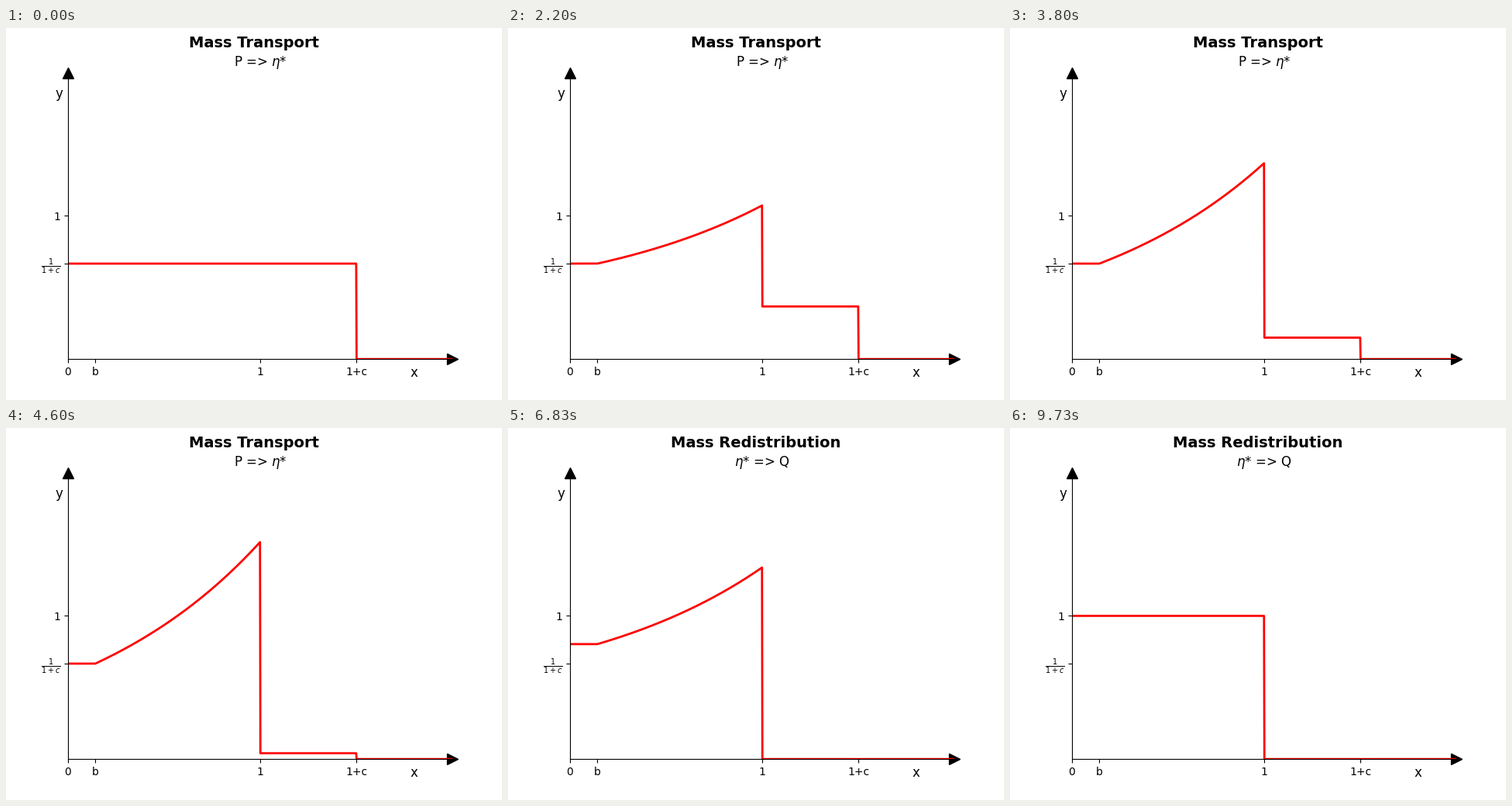
A matplotlib script that plays this animation: 640x480 px, repeating every 9.83 s.

```python
import numpy as np
import matplotlib.pyplot as plt
from matplotlib.animation import FuncAnimation

LOOP = 9830        # ms
FRAMES = 364
SPLIT = 4930       # start of the redistribution phase, ms
STEP = 100         # ms per pose
LAST = 49          # steps in each phase

plt.rcParams["font.family"] = "DejaVu Sans"

c = 0.5
base = 1 / (1 + c)

# Newton's method for exp(d) = 1 + c + d, with d = 1 - b
d = 1.0
for _ in range(30):
    d -= (np.exp(d) - 1 - c - d) / (np.exp(d) - 1)
b = 1 - d

x = np.linspace(0, 2, 1000)
start = np.where(x <= 1 + c, base, 0)
middle = np.where(x <= 1, base * np.exp(np.maximum(x - b, 0)), 0)
end = np.where(x <= 1, 1.0, 0)


def blend(u, v, t):
    return (1 - t) * u + t * v


fig, ax = plt.subplots(figsize=(6.4, 4.8), dpi=100)
fig.subplots_adjust(left=0.125, right=0.9, bottom=0.11, top=0.88)
ax.set(xlim=(0, 2), ylim=(0, 2))
ax.spines[["top", "right"]].set_visible(False)
ax.set_xticks([0, b, 1, 1 + c], ["0", "b", "1", "1+c"])
ax.set_yticks([base, 1], [r"$\frac{1}{1+c}$", "1"])

# Arrowheads at the ends of the axes
ax.plot(1, 0, ">k", ms=10, transform=ax.transAxes, clip_on=False)
ax.plot(0, 1, "^k", ms=10, transform=ax.transAxes, clip_on=False)
fig.text(526.4 / 640, 30 / 480, "x", fontsize=12, ha="center", va="baseline")
fig.text(68 / 640, 385.5 / 480, "y", fontsize=12, ha="center", va="bottom")

heading = fig.suptitle("", fontsize=14, fontweight="bold")
subtitle = ax.set_title("", fontsize=12)
curve, = ax.plot(x, start, color="red", lw=2)


def update(n):
    # Use the pose that is due by the end of this frame
    now = (n + 1) * LOOP / FRAMES - 0.01
    if now < SPLIT:
        t = min(now // STEP, LAST) / LAST
        curve.set_ydata(blend(start, middle, t))
        heading.set_text("Mass Transport")
        subtitle.set_text(r"P => $\eta$*")
    else:
        t = min(1 + (now - SPLIT) // STEP, LAST) / LAST
        curve.set_ydata(blend(middle, end, t))
        heading.set_text("Mass Redistribution")
        subtitle.set_text(r"$\eta$* => Q")
    return curve, heading, subtitle


anim = FuncAnimation(fig, update, frames=FRAMES, interval=LOOP / FRAMES,
                     repeat=True, repeat_delay=0, blit=False)
plt.show()
```
